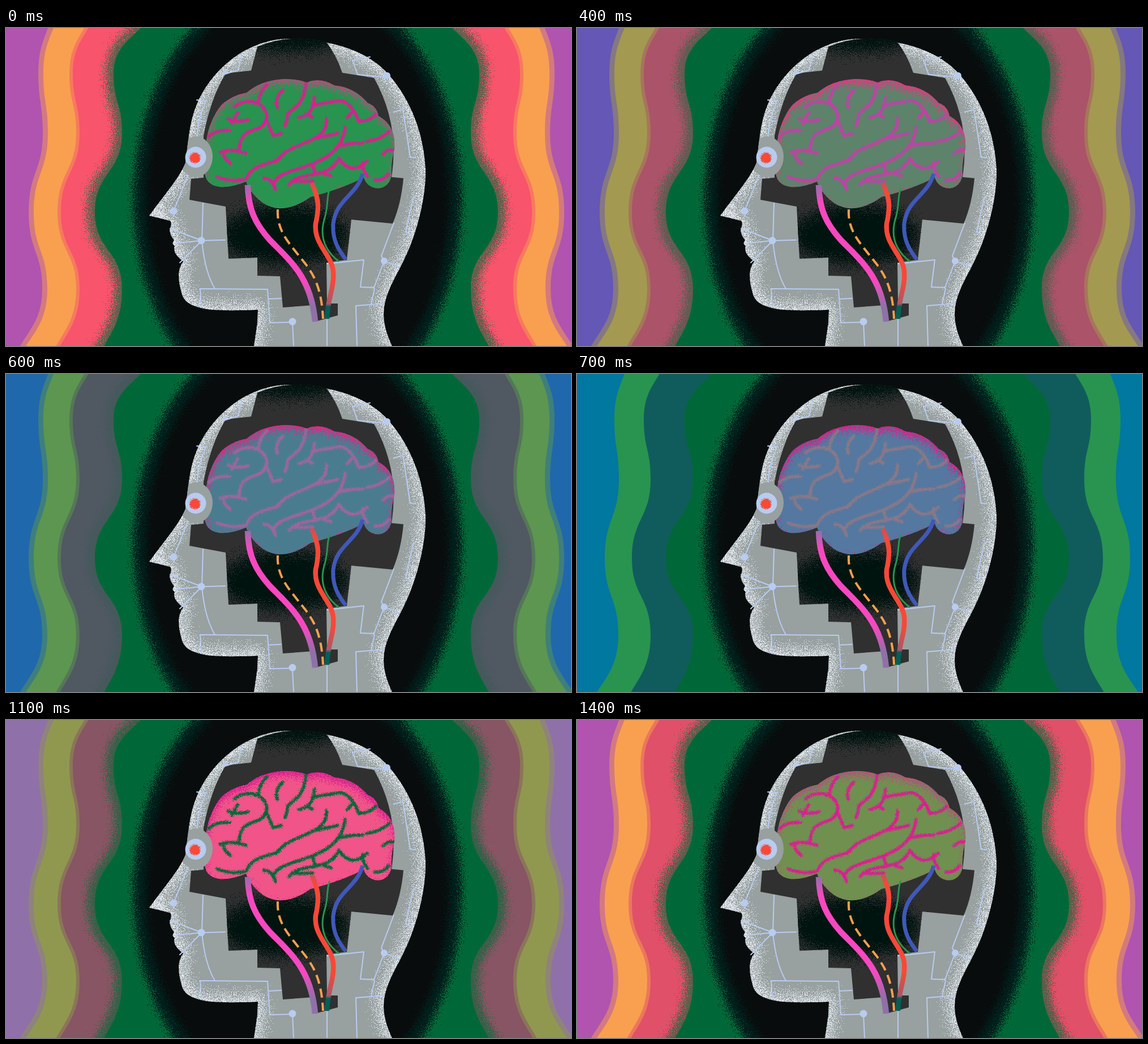
An HTML page that plays this animation: 998 px wide and 561 px high, repeating every 1500 ms.

```html
<!DOCTYPE html>
<html lang="en">
<head>
<meta charset="utf-8">
<title>Robot head with a colour-shifting brain</title>
<style>
  html, body { margin: 0; width: 100%; height: 100%; overflow: hidden; background: #080c0c; }
  svg { display: block; }
  .line { fill: none; stroke-linecap: round; stroke-linejoin: round; }
  .cable { fill: none; }
</style>
</head>
<body>
<svg id="stage" width="998" height="561" viewBox="0 0 998 561">
  <defs>
    <path id="waveA"/><path id="waveB"/><path id="waveC"/>
    <path id="head" d="M500 19C430 19 362 70 335 140C324 168 322 200 317 238C308 262 278 297 253 331L290 340Q294 345 289 356
      Q290 366 297 374L294 380L298 385Q293 396 313 412C300 430 306 450 311 470C320 499 370 500 445 497L444 520L438 561V610H700
      L682 561C655 505 668 475 695 425C725 370 742 300 741 250C738 190 718 130 674 80Q620 22 500 19Z"/>
    <path id="hollow" d="M444 33L433 75L388 80Q361 125 349 190V264L327 266L324 303L388 315L393 407L444 405V437L484 438L489 493
      L543 489L546 518L586 507V486H567L566 414L602 409L610 338L683 345Q698 310 702 265L681 263Q696 170 650 88L594 79
      Q583 46 565 24Q500 10 444 33Z"/>
    <path id="brain" d="M352 238C350 190 362 158 381 135Q400 118 425 114Q450 92 490 90Q515 89 531 96Q555 86 580 101
      Q615 104 639 132Q655 138 658 155Q690 172 686 215Q680 235 681 258C678 290 640 290 632 264Q590 285 538 298
      C500 325 460 330 428 281L424 271Q395 283 375 280Q345 275 352 238Z"/>
    <clipPath id="headClip"><use href="#head"/></clipPath>
    <clipPath id="hollowClip"><use href="#hollow"/></clipPath>
    <clipPath id="brainClip"><use href="#brain"/></clipPath>
    <linearGradient id="pinkCable" gradientUnits="userSpaceOnUse" x1="0" y1="275" x2="0" y2="520">
      <stop offset="0" stop-color="#9070a8"/><stop offset=".14" stop-color="#f848c0"/>
      <stop offset=".7" stop-color="#f848c0"/><stop offset=".88" stop-color="#9070a8"/>
    </linearGradient>
    <linearGradient id="redCable" gradientUnits="userSpaceOnUse" x1="0" y1="272" x2="0" y2="513">
      <stop offset="0" stop-color="#c85058"/><stop offset=".08" stop-color="#f84838"/>
      <stop offset=".72" stop-color="#f84838"/><stop offset=".89" stop-color="#a85868"/>
      <stop offset=".91" stop-color="#006058"/>
    </linearGradient>
  </defs>

  <rect width="998" height="561" fill="var(--outer)"/>
  <use href="#waveA" fill="none" stroke="var(--middle)" stroke-width="18" stroke-opacity="var(--halo)"/>
  <use href="#waveA" fill="var(--middle)"/>
  <use href="#waveB" fill="none" stroke="var(--inner)" stroke-width="12" stroke-opacity="var(--halo)"/>
  <use href="#waveB" fill="var(--inner)"/>
  <use href="#waveC" fill="none" stroke="#006838" stroke-width="28" stroke-opacity="var(--fuzz)" filter="url(#spray60)"/>
  <use href="#waveC" fill="#006838"/>
  <ellipse cx="515" cy="303" rx="290" ry="396" fill="#00201c" filter="url(#spray60)"/>
  <ellipse cx="515" cy="303" rx="268" ry="372" fill="#080c0c" filter="url(#spray60)"/>

  <use href="#head" fill="#98a0a0"/>
  <g clip-path="url(#headClip)">
    <use href="#head" fill="none" stroke="#e0e6ec" stroke-width="18" filter="url(#spray100)"/>
  </g>

  <use href="#hollow" fill="#303030"/>
  <g clip-path="url(#hollowClip)" fill="#00140f" filter="url(#none)">
    <ellipse cx="504" cy="18" rx="90" ry="24" filter="url(#spray100)"/>
    <ellipse cx="492" cy="365" rx="112" ry="52" filter="url(#spray100)"/>
  </g>

  <path class="line" stroke="#b8ccf0" stroke-width="2" d="M327 246L298 318M335 209L341 163L353 128L337 127M341 163L351 165
    M388 81L410 74L416 48M348 309L346 375L387 374M290 354L346 375L297 380M346 375L307 414M346 375Q351 430 369 460
    M345 493L343 460L462 461L466 520L506 519L508 561M464 478L486 477M643 51L612 57L621 82L673 87
    M685 148L701 144L714 228L723 229M725 295L719 300L706 360L717 364M685 344L663 402L668 411L650 458L626 457L632 409L567 416
    M668 411L695 421M651 460L645 487M668 486L618 490L620 561M567 515V561"/>
  <g fill="#b8ccf0">
    <circle cx="296" cy="323" r="6.5"/><circle cx="345" cy="375" r="6.5"/><circle cx="506" cy="518" r="6.5"/>
    <circle cx="673" cy="84" r="6"/><circle cx="668" cy="411" r="6"/><path d="M383 84a6 6 0 0 1 9-7l-4 5z"/>
  </g>

  <g clip-path="url(#brainClip)">
    <use href="#brain" fill="var(--rim)"/>
    <use href="#brain" y="8" fill="var(--brain)" filter="url(#spray60)"/>
    <path class="line" stroke="var(--folds)" stroke-width="5.5" filter="url(#spray10)" d="
      M404 139C430 118 466 136 460 162L472 190L486 186M446 130Q449 110 461 100M460 160C452 190 412 170 412 214
      M392 160Q405 168 428 162M399 168L409 150M358 191Q374 178 396 181M378 219Q398 212 424 221M384 220Q386 233 396 238
      M373 263Q402 273 424 267C434 240 465 240 480 233C500 200 570 205 566 160M540 196L586 186
      M489 110Q474 122 479 140M530 98C524 150 494 140 497 160L493 172M545 122C543 150 530 155 517 158M532 153L541 157
      M541 136L590 128Q612 132 623 165M612 148L603 158M455 265Q472 266 476 285M472 276C480 240 590 255 599 175
      M584 210Q604 202 630 203M500 276C520 250 570 270 588 230Q610 262 638 235M513 271L542 270M546 257L542 242M558 255L574 261
      M625 164Q641 165 653 153M637 200Q661 197 678 182M666 222Q674 213 686 215M630 237Q629 251 639 262M651 268Q666 270 676 257"/>
  </g>

  <g class="cable">
    <path stroke="url(#pinkCable)" stroke-width="10.5" d="M427 277C428 320 440 345 466 374C503 412 539 440 546 518"/>
    <path stroke="#f8a050" stroke-width="4" stroke-dasharray="16 9" d="M480 320C478 355 497 376 516 400S557 445 560 513"/>
    <path stroke="#289450" stroke-width="3" d="M572 284C566 295 570 310 563 335C553 367 562 392 588 412"/>
    <path stroke="#4058b8" stroke-width="7" d="M630 257C620 295 583 302 578 345C576 375 588 392 600 408"/>
    <path stroke="url(#redCable)" stroke-width="8.5" d="M540 273C552 300 554 315 547 345C543 382 576 400 578 430C580 460 568 475 567 513"/>
  </g>

  <g clip-path="url(#headClip)"><ellipse cx="335" cy="227" rx="30" ry="36" fill="#98a0a0"/></g>
  <circle cx="335" cy="228" r="18.5" fill="#b8ccf0"/>
  <circle cx="334" cy="229" r="9.5" fill="#f84838" filter="url(#spray10)"/>
</svg>
<script>
const stage = document.getElementById('stage');

// Grainy edges: scatter the pixels of a shape with fine noise.
for (const scale of [10, 60, 100]) {
  stage.querySelector('defs').insertAdjacentHTML('beforeend', `
    <filter id="spray${scale}" filterUnits="userSpaceOnUse" x="-40" y="-40" width="1080" height="640" color-interpolation-filters="sRGB">
      <feTurbulence type="fractalNoise" baseFrequency=".73" numOctaves="1" seed="${scale}"/>
      <feDisplacementMap in="SourceGraphic" scale="${scale}" xChannelSelector="R" yChannelSelector="G"/>
    </filter>`);
}

// Every band swings between turning points at the same heights, mirrored about the centre line.
const turns = [-60, 80, 185, 325, 460, 640];
function edge(points) {
  return points.slice(1).reduce((d, [x, y], i) => {
    const [x0, y0] = points[i], mid = (y0 + y) / 2;
    return `${d}C${x0} ${mid} ${x} ${mid} ${x} ${y}`;
  }, points[0].join(' '));
}
function setWave(id, ...xs) {
  const left = xs.map((x, i) => [x, turns[i]]);
  const right = left.map(([x, y]) => [1026 - x, y]).reverse();
  document.getElementById(id).setAttribute('d', `M${edge(left)}L${edge(right)}Z`);
}
setWave('waveA', 94, 66, 74, 49, 73, 12);
setWave('waveB', 161, 118, 130, 97, 130, 74);
setWave('waveC', 265, 190, 205, 157, 205, 154);

// Colour stops as step:colour; the last stop runs back into the first.
const STEPS = 15, COOLEST = 7;
const tracks = Object.entries({
  outer: '0:b054b0 2:b054b0 5:4058b8 7:0078a0 9:4058b8 11:9070a8 14:b054b0',
  middle: '0:f8a050 2:c89c50 5:909850 7:289450 9:289450 11:909850 14:f8a050',
  inner: '0:f8546c 2:e05068 5:905468 7:105c5c 14:e05068',
  brain: '0:289450 2:988840 5:408080 7:5478a0 9:f8546c 11:f05488 14:709050',
  folds: '0:d82090 2:d82090 5:b054b0 7:887888 11:006838 14:d82090',
  rim: '0:a05878 2:e04c78 7:c82888 9:f83c90 11:d82090 14:a85878',
}).map(([name, text]) => {
  const stops = text.split(' ').map(stop => stop.split(':'));
  return { name, stops: [...stops, [STEPS, stops[0][1]]] };
});

const channels = hex => [0, 2, 4].map(i => parseInt(hex.slice(i, i + 2), 16));
function colourAt(stops, step) {
  const next = stops.findIndex(([at]) => at > step);
  const [[t0, from], [t1, to]] = [stops[next - 1], stops[next]];
  const end = channels(to), mix = (step - t0) / (t1 - t0);
  return `rgb(${channels(from).map((v, i) => Math.round(v + (end[i] - v) * mix))})`;
}

let shown = -1;
function draw() {
  const step = Math.floor(performance.now() / 100) % STEPS;
  if (step !== shown) {
    shown = step;
    for (const { name, stops } of tracks) stage.style.setProperty('--' + name, colourAt(stops, step));
    // Band edges are crisp only when the colours are coolest.
    const warmth = Math.abs(step - COOLEST);
    stage.style.setProperty('--halo', Math.min(0.5, warmth));
    stage.style.setProperty('--fuzz', Math.min(0.6, warmth * 0.15));
  }
  requestAnimationFrame(draw);
}
draw();
</script>
</body>
</html>
```
